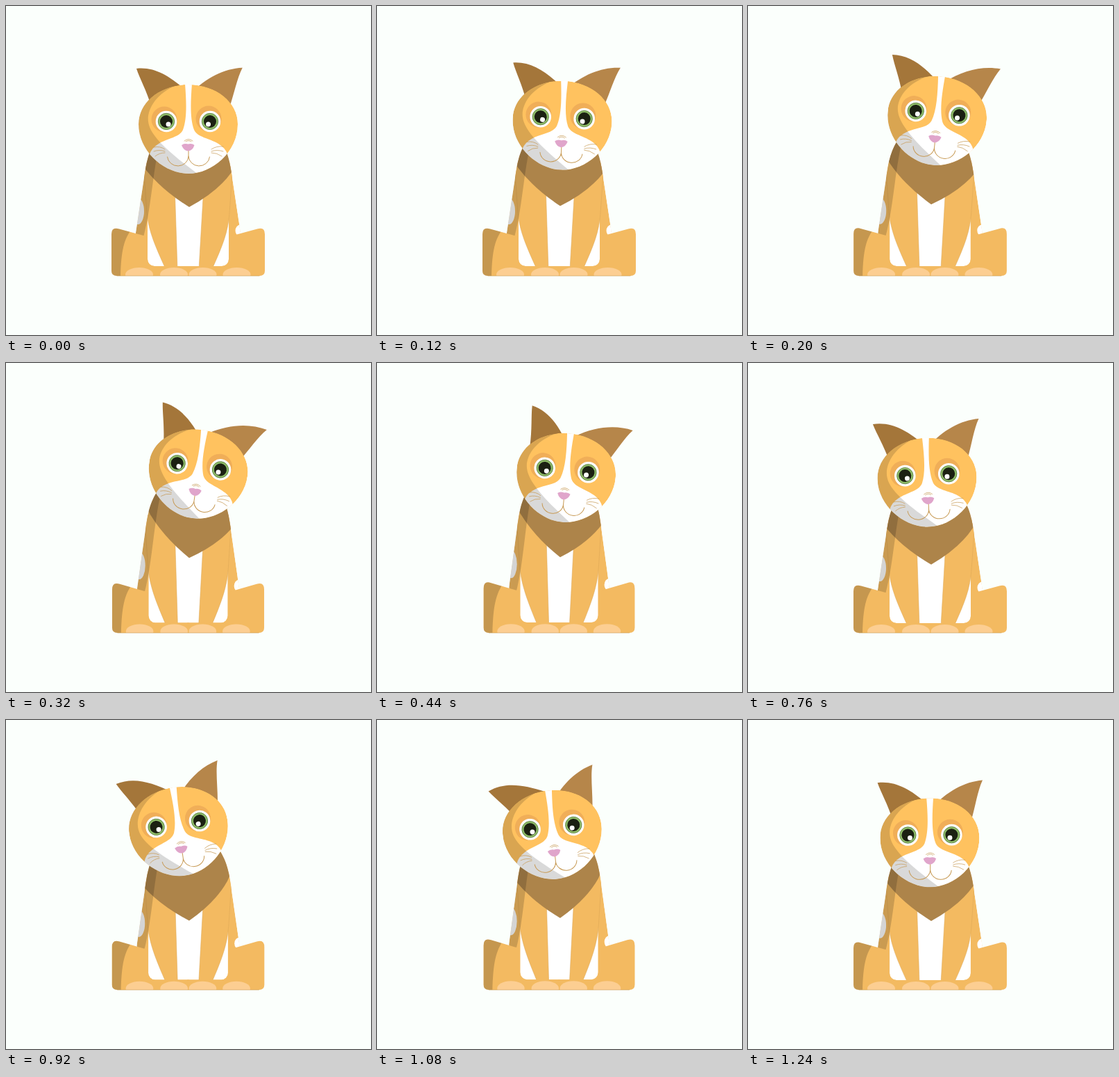
Animation of 526x473 px, one loop 1.28 s. Source, as an HTML page:

```html
<!DOCTYPE html>
<html lang="en">
<head>
<meta charset="utf-8">
<title>Cat</title>
<style>
  html, body { margin: 0; height: 100%; overflow: hidden; background: #fbfffc; }
  svg { display: block; width: 526px; height: 473px; }
  .fur { fill: #f3ba61; }
  .white { fill: #fff; }
  .paw { fill: #fcce92; }
  .line { fill: none; stroke: #c79a55; stroke-linecap: round; }
</style>
</head>
<body>
<svg viewBox="0 0 526 473">
  <defs>
    <path id="trunk" d="M187 326L200 240C203 222 206 205 222 185H303C319 205 322 222 325 240L338 326V388H187Z"/>
    <path id="skull" d="M191 170C191 138 222 113 262.500 113S334 138 334 170C334 210 297 241 263 241S191 210 191 170Z"/>
    <path id="haunch" d="M163 320.500Q152 317 152 328V381Q152 388 160 388H264V374H214Q204 374 204 364V331L198 330Z"/>
    <clipPath id="inTrunk"><use href="#trunk"/></clipPath>
    <clipPath id="inSkull"><use href="#skull"/></clipPath>
    <clipPath id="inHaunch"><use href="#haunch"/></clipPath>
    <clipPath id="aboveFloor"><path d="M150 370H376V388H150Z"/></clipPath>
    <g id="eye">
      <circle class="white" r="15.300"/>
      <circle r="11.700" fill="#8fbc68" stroke="#567a3d" stroke-width=".8"/>
      <circle r="9" fill="#1b2012"/>
    </g>
  </defs>

  <g id="torso">
    <g clip-path="url(#inTrunk)">
      <use href="#trunk" class="fur"/>
      <rect class="white" x="204" y="240" width="117" height="134" rx="10"/>
      <g class="fur" stroke="#d9a455" stroke-width=".5">
        <path d="M198 225H242L247 378H230C215 345 206 325 203 298Z"/>
        <path d="M327 225H287L278 378H297C312 345 320 325 322 298Z"/>
      </g>
      <ellipse class="white" cx="190" cy="295" rx="9" ry="19"/>
      <ellipse class="white" cx="338" cy="323" rx="7.500" ry="8.500"/>
      <path id="scarf" fill="#ad844a" d="M180 205L201 235Q225 265 264 289Q305 267 325 239L345 205L300 165H220Z"/>
      <path d="M170 180H226C212 225 210 290 198 332H170Z" opacity=".17"/>
    </g>
  </g>

  <g id="seat">
    <use href="#haunch" class="fur"/>
    <use href="#haunch" class="fur" transform="matrix(-1 0 0 1 525 0)"/>
    <path d="M150 315H186C170 332 166 350 165 390H150Z" opacity=".19" clip-path="url(#inHaunch)"/>
    <g class="paw" clip-path="url(#aboveFloor)">
      <ellipse cx="192" cy="386" rx="20" ry="10"/>
      <ellipse cx="242" cy="386" rx="20" ry="10"/>
      <ellipse cx="283.500" cy="386" rx="20" ry="10"/>
      <ellipse cx="332.500" cy="386" rx="20" ry="10"/>
    </g>
    <path class="line" d="M160 388H365" stroke-width=".6"/>
  </g>

  <g id="head">
    <path id="leftEar" fill="#a4763a" d="M188 90C215 87 238 102 262 124L210 146C202 120 193 105 188 90Z"/>
    <path id="rightEar" fill="#b6864a" d="M341 89C315 90 288 103 266 126L322 146C329 126 333 104 341 89Z"/>
    <g clip-path="url(#inSkull)">
      <use href="#skull" fill="#ffc25f"/>
      <circle cx="228" cy="163" r="18.500" fill="#f0ae58"/>
      <circle cx="292" cy="162" r="18.500" fill="#f0ae58"/>
      <path class="white" d="M258 112H268C266 138 265 162 271 178C276 189 293 190 306 198Q316 204 319 213V250H207V213Q210 204 220 198C233 190 250 189 255 178C261 162 260 138 258 112Z"/>
      <path d="M250 112C215 125 203 150 205 166C207 185 230 207 277 242H185V112Z" opacity=".15"/>
    </g>
    <use href="#eye" x="231" y="166"/>
    <use href="#eye" x="294" y="166"/>
    <circle class="white" cx="234" cy="170" r="3.500"/>
    <circle class="white" cx="291.500" cy="170" r="3.500"/>
    <path class="line" d="M263 207V216A15.300 14.500 0 0 1 232.500 217M263 216A15.300 14.500 0 0 0 293.500 217"/>
    <path fill="#e0a5cb" d="M253 200Q257 197 262.500 198.500Q268 197 271.500 200Q269 208 262.500 208.500Q256 208 253 200Z"/>
    <path class="line" stroke-width=".7" d="M257 194Q263 189 269 194M259 195Q263 192 267 195M229 206Q222 201 213 203M229 209Q221 206 213 209M229 211Q221 211 215 216M296 206Q303 201 313 202M296 209Q304 206 313 209M296 211Q304 211 311 216"/>
  </g>
</svg>
<script>
  const LOOP = 1280, STEP = 40;
  const part = Object.fromEntries(
    ["torso", "seat", "scarf", "head", "leftEar", "rightEar"].map(id => [id, document.getElementById(id)]));
  const set = (name, transform) => part[name].setAttribute("transform", transform);
  const scaleOnFloor = (name, x, y) =>
    set(name, `translate(262.5 388) scale(${x} ${y}) translate(-262.5 -388)`);

  // Swings one way in the first half of the loop and the other way in the second.
  const swing = t => {
    const s = Math.sin(2 * Math.PI * t / LOOP);
    return s * Math.abs(s);
  };

  // Late swing of the left ear; its size also drives the breathing.
  const keys = [[0, 0], [150, 0], [440, 1], [720, 0], [800, 0], [1060, -1], [1260, 0], [LOOP, 0]];
  const lateSwing = t => {
    const i = keys.findIndex(([end]) => t < end);
    const [t0, a] = keys[i - 1], [t1, b] = keys[i];
    const u = (t - t0) / (t1 - t0);
    return a + (b - a) * u * u * (3 - 2 * u);
  };

  function draw(t) {
    const k = swing(t), late = lateSwing(t), breath = Math.abs(late);
    scaleOnFloor("torso", 1 - 0.043 * breath, 1 + 0.063 * breath);
    scaleOnFloor("seat", 1 - 0.014 * breath, 1 + 0.063 * breath);
    set("scarf", `translate(0 ${-3.5 * k - 1.2 * Math.abs(k)}) rotate(${5.5 * k} 264 289)`);
    set("head", `translate(${13.7 * k} ${-17.3 * Math.abs(k)}) rotate(${8.4 * k} 262.5 177)`);
    set("leftEar", `rotate(${19 * late} 230 132)`);
    set("rightEar", `rotate(${15 * swing(t - 60) + 1} 306 136)`);
  }

  function tick() {
    draw(Math.floor(performance.now() % LOOP / STEP) * STEP);
    requestAnimationFrame(tick);
  }
  tick();
</script>
</body>
</html>
```
